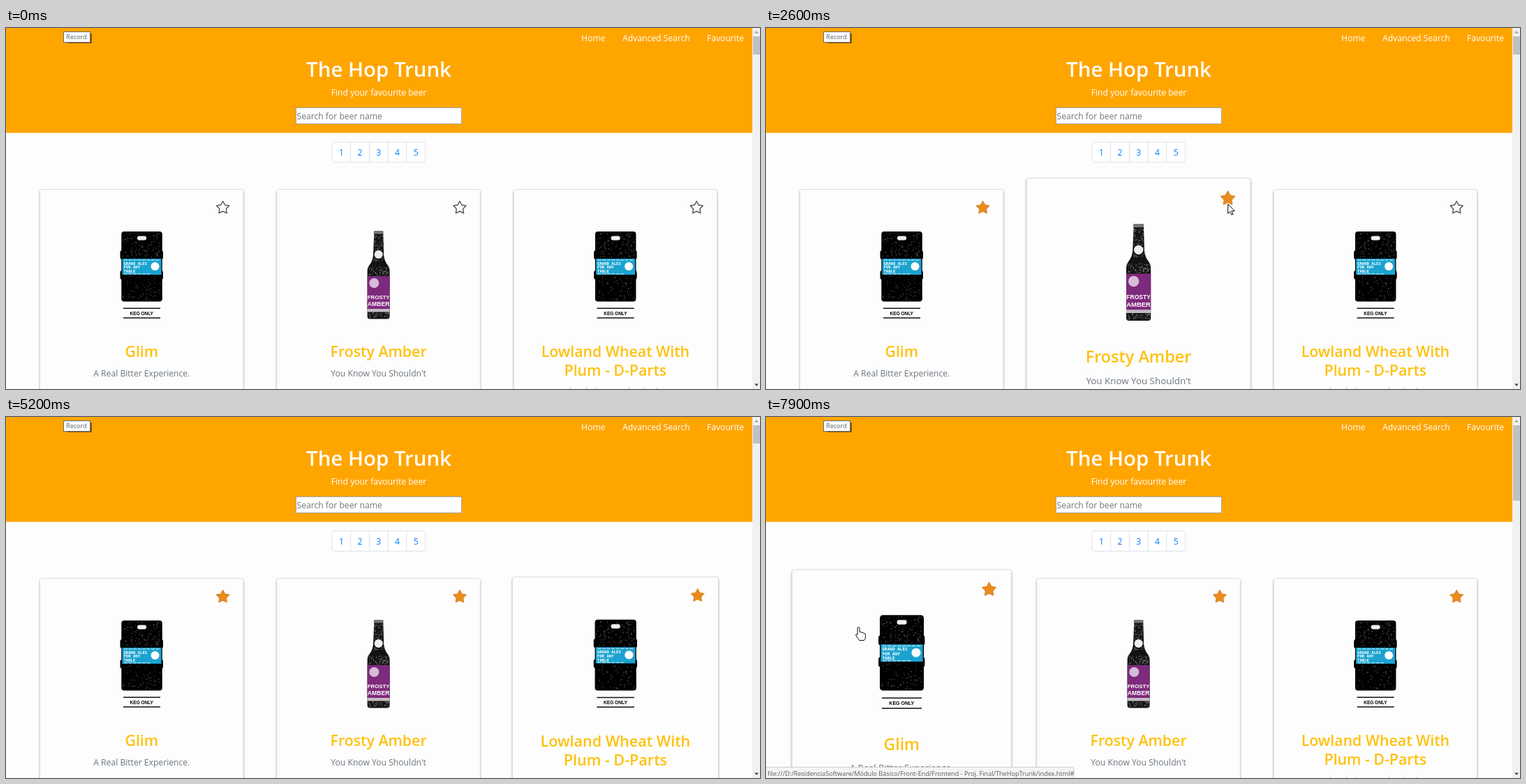
Recreate the animation shown at these times as an HTML page. Size 1080 by 518 pixels, loop 8 s.

```html
<!DOCTYPE html>
<html lang="en">
<head>
<meta charset="utf-8">
<style>
  html, body { margin: 0; width: 100%; height: 100%; overflow: hidden; background: #fdfdfd; }
  svg { display: block; width: 1080px; height: 518px; font: 12.15px "Open Sans", "Noto Sans", sans-serif; }
  .mid { text-anchor: middle; }
  .white { fill: #fff; }
  .frame { fill: #fdfdfd; stroke: #dcdcdc; filter: drop-shadow(0 2px 1.3px #0005); }
  .name { font-size: 21.3px; font-weight: 600; fill: #ffc10d; }
  .star { stroke: #555; stroke-width: 1.4; stroke-linejoin: round; fill: none; }
  .star.on { stroke: #dd8a2c; fill: #ec8a1c; }
  .label { font: bold 5.6px "DejaVu Sans Mono", monospace; fill: #fff; }
  .print { font-family: "Liberation Sans", sans-serif; font-weight: bold; }
  .small { font-size: 9.15px; fill: #5a5d61; }
</style>
</head>
<body>
<svg viewBox="0 0 1080 518">
  <rect id="header" height="150.500" fill="#ffa500"/>
  <g id="nav" class="white">
    <text x="824" y="19">Home</text>
    <text x="883" y="19">Advanced Search</text>
    <text id="favourite" class="mid" x="1030.5" y="19">Favourite</text>
  </g>
  <g id="center">
    <text class="mid white" x="534" y="69.500" font-size="29.400" font-weight="600">The Hop Trunk</text>
    <text class="mid white" x="534" y="97">Find your favourite beer</text>
    <rect x="415.5" y="114.500" width="237" height="23" fill="#fff" stroke="#a5a5a5"/>
    <text x="416.5" y="131" fill="#757575">Search for beer name</text>
    <g id="pages"><rect x="467" y="163.500" width="133.500" height="29" rx="3.200" fill="#fff" stroke="#dee2e6"/></g>
  </g>
  <g id="cards"></g>
  <g id="scrollbar">
    <path d="M1069 0h11v518h-11z" fill="#f1f1f1"/>
    <rect id="thumb" x="1070" y="12" width="10" fill="#c1c1c1"/>
    <path d="M1072 7.500l3-3.500 3 3.500z" fill="#a3a3a3"/>
    <path d="M1072 510.500l3 3.500 3-3.500z" fill="#505050"/>
  </g>
  <path d="M85 8h38v14h-35z" fill="#0007"/>
  <rect x="82.500" y="5.500" width="38" height="15" fill="#fff" stroke="#6c6c6c"/>
  <text class="small" x="86" y="16">Record</text>
  <g id="status">
    <rect id="statusBox" x="-4" y="502.500" height="22" rx="3" fill="#f4f4f4" stroke="#cfcfcf"/>
    <text id="statusText" class="small" x="2" y="514.500"></text>
  </g>
  <path id="cursor" fill="#fff" stroke="#111" stroke-linejoin="round"/>
</svg>
<script>
const $ = id => document.getElementById(id);
const LOOP = 8000, STEP = 100, HOVER = 400;
const CARD_X = 194.3, CARD_Y = 391.5, CARD_GAP = 339.3;

const ARROW = 'M0 0V13.500L3.200 10.600 5.300 15.500 7.400 14.600 5.300 9.800H9.600Z';
const HAND = 'M-1.500 10V1.500a1.500 1.500 0 0 1 3 0V7q3-1 3 1q3-1 3 1q2.500-.5 2.500 2v3.500q0 2-2 4.500h-7q-1.500-2.500-5-7.500q.5-2.500 2.500-.5z';

let seed = 7;
const random = () => (seed = seed * 16807 % 2147483647) / 2147483647;

// Worn-print speckles inside a box
function speckles(x, y, w, h, count) {
  let d = '';
  for (let i = 0; i < count; i++)
    d += `M${(x + random() * w).toFixed(1)} ${(y + random() * h).toFixed(1)}h${(.3 + random() * .7).toFixed(1)}`;
  return `<path d="${d}" stroke="#ccc" stroke-width=".7"/>`;
}

const starPoints = Array.from({ length: 10 }, (_, i) => {
  const r = i % 2 ? 5 : 9.5, a = i * Math.PI / 5;
  return [310.6 + r * Math.sin(a), 258 - r * Math.cos(a)].map(v => v.toFixed(2));
}).join(' ');

const keg = () => `
  <rect x="165.300" y="292" width="58.500" height="100.500" rx="4"/>
  <rect x="163.500" y="319" width="61.500" height="13" rx="3"/>
  <rect x="163.500" y="348" width="61.500" height="13" rx="3"/>
  ${speckles(167, 294, 55, 36, 130)}${speckles(167, 356, 55, 35, 80)}
  <rect x="188" y="298.500" width="13" height="6" rx="3" fill="#eee"/>
  <path d="M166.500 331h56v23h-56z" fill="#1ba3d0"/>
  <path d="M169 333h51M169 352.800h38" stroke="#fff" stroke-dasharray="5 1.500" stroke-width=".8"/>
  <g class="label"><text x="168.500" y="339.500">GRAND ALES</text><text x="168.500" y="345.300">FOR ANY</text><text x="168.500" y="351.200">TABLE</text></g>
  <circle cx="213.500" cy="342" r="6" fill="#fff"/>
  <path d="M168 402.300h53M168 416h53" stroke="#111" stroke-width="1.400"/>
  <text class="mid print" x="194.300" y="411.500" font-size="6.500">KEG ONLY</text>`;

const bottle = () => `
  <path d="M188 295h13l1 32q1 8 6 14q2.300 3 2.300 8v65q0 3.500-4 3.500h-24q-4 0-4-3.500v-65q0-5 2.300-8q5-6 6-14z" fill="#131313"/>
  <rect x="187.300" y="291" width="14" height="4.500" rx="1.500" fill="#777"/>
  ${speckles(188, 297, 13, 38, 110)}${speckles(180, 343, 29, 12, 90)}${speckles(180, 408, 29, 8, 60)}
  <circle cx="194.300" cy="325" r="6" fill="#eee"/>
  <path d="M178.300 356h32v48h-32z" fill="#7e2a7c"/>
  <path d="M178.300 403h32v4.500h-32z" fill="#c4bcc4"/>
  <circle cx="188" cy="366" r="7" fill="#d6bcd8"/>
  <g class="mid print white"><text x="194.300" y="389" font-size="7.800">FROSTY</text><text x="194.300" y="399" font-size="8.600">AMBER</text></g>`;

const beers = [
  { name: ['Glim'], note: 'A Real Bitter Experience.', picture: keg, hovers: [[350, 1680], [7710, 9000]], liked: 1200 },
  { name: ['Frosty Amber'], note: "You Know You Shouldn't", picture: bottle, hovers: [[1693, 3010]], liked: 2200 },
  { name: ['Lowland Wheat With', 'Plum - D-Parts'], note: 'Orchard Plum Lowland Wheat.', picture: keg, hovers: [[3015, 4965]], liked: 4000 }
];

$('cards').innerHTML = beers.map(({ name, note, picture }) => `<g>
  <rect class="frame" x="48.500" y="231.500" width="291.500" height="320" rx="3"/>
  <polygon class="star" points="${starPoints}"/>
  ${picture()}
  ${name.map((line, i) => `<text class="mid name" x="${CARD_X}" y="${472 + i * 26.5}">${line}</text>`).join('')}
  <text class="mid" x="${CARD_X}" y="${473.5 + name.length * 26.5}" fill="#6c757d">${note}</text></g>`).join('');

for (let i = 0; i < 5; i++)
  $('pages').innerHTML += `<text class="mid" x="${480.4 + i * 26.7}" y="182.500" fill="#007bff">${i + 1}</text>` +
    (i ? `<path d="M${467 + i * 26.7} 163.500v29" stroke="#dee2e6"/>` : '');

// Cursor way points: time, x, y
const route = [
  [200, 290, 545], [300, 296, 505], [900, 316, 250], [1400, 318, 252], [1680, 350, 262],
  [1800, 595, 267], [2000, 657, 242], [2200, 657, 242], [2800, 664, 258], [3010, 705, 272],
  [3200, 1006, 258], [3800, 996, 244], [4400, 996, 244], [4500, 979, 247], [4965, 1008, 214],
  [5180, 1060, -30], [5350, 1050, -30], [5600, 1034, 12], [5900, 1030.5, 11], [7450, 1030.5, 11],
  [7700, 345, 225], [7900, 132.5, 301.5]
];

function cursorAt(t) {
  const i = route.findIndex(p => p[0] > t);
  if (i < 0) return route.at(-1).slice(1);
  if (!i) return route[0].slice(1);
  const [t0, x0, y0] = route[i - 1], [t1, x1, y1] = route[i], k = (t - t0) / (t1 - t0);
  return [x0 + (x1 - x0) * k, y0 + (y1 - y0) * k];
}

// The CSS "ease" curve
function ease(x) {
  if (x <= 0 || x >= 1) return x <= 0 ? 0 : 1;
  const bezier = (u, a, b) => 3 * (1 - u) ** 2 * u * a + 3 * (1 - u) * u * u * b + u ** 3;
  let low = 0, high = 1;
  for (let i = 0; i < 20; i++) {
    const mid = (low + high) / 2;
    if (bezier(mid, .25, .25) < x) low = mid; else high = mid;
  }
  return bezier(low, .1, 1);
}

const hoverScale = (t, hovers) => 1 + .1 * hovers.reduce(
  (sum, [on, off]) => sum + ease((t - on) / HOVER) - ease((t - off) / HOVER), 0);
const scaleAbout = (x, y, s) => `translate(${x} ${y}) scale(${s}) translate(${-x} ${-y})`;
const show = (id, visible) => $(id).setAttribute('visibility', visible ? 'visible' : 'hidden');

function draw(t) {
  const empty = t >= 6100 && t < 6900, reloaded = t >= 6900;

  $('header').setAttribute('width', empty ? 1080 : 1069);
  $('nav').setAttribute('transform', `translate(${empty ? 13 : 0})`);
  $('center').setAttribute('transform', `translate(${empty ? 6.5 : 0})`);
  $('favourite').setAttribute('transform', scaleAbout(1030.5, 15, hoverScale(t, [[5550, 7450]])));
  $('thumb').setAttribute('height', reloaded ? 108 : 26);
  show('cards', !empty);
  show('scrollbar', !empty);

  beers.forEach(({ hovers, liked }, i) => {
    const card = $('cards').children[i];
    card.setAttribute('transform', `translate(${i * CARD_GAP}) ` + scaleAbout(CARD_X, CARD_Y, hoverScale(t, hovers)));
    card.querySelector('.star').classList.toggle('on', t >= liked);
  });

  show('status', t >= 5700);
  $('statusBox').setAttribute('width', 362 + 83 * ease((t - 6900) / 300));
  $('statusText').textContent = t < 7100
    ? 'D:/ResidenciaSoftware/Módulo Básico/Front-End/Frontend - Proj. Final/.../index.ht...'
    : 'file:///D:/ResidenciaSoftware/Módulo Básico/Front-End/Frontend - Proj. Final/TheHopTrunk/index.html#';

  $('cursor').setAttribute('d', t >= 5600 ? HAND : ARROW);
  $('cursor').setAttribute('transform', `translate(${cursorAt(t)})`);
}

function tick() {
  draw(Math.floor(performance.now() % LOOP / STEP) * STEP);
  requestAnimationFrame(tick);
}
tick();
</script>
</body>
</html>
```
